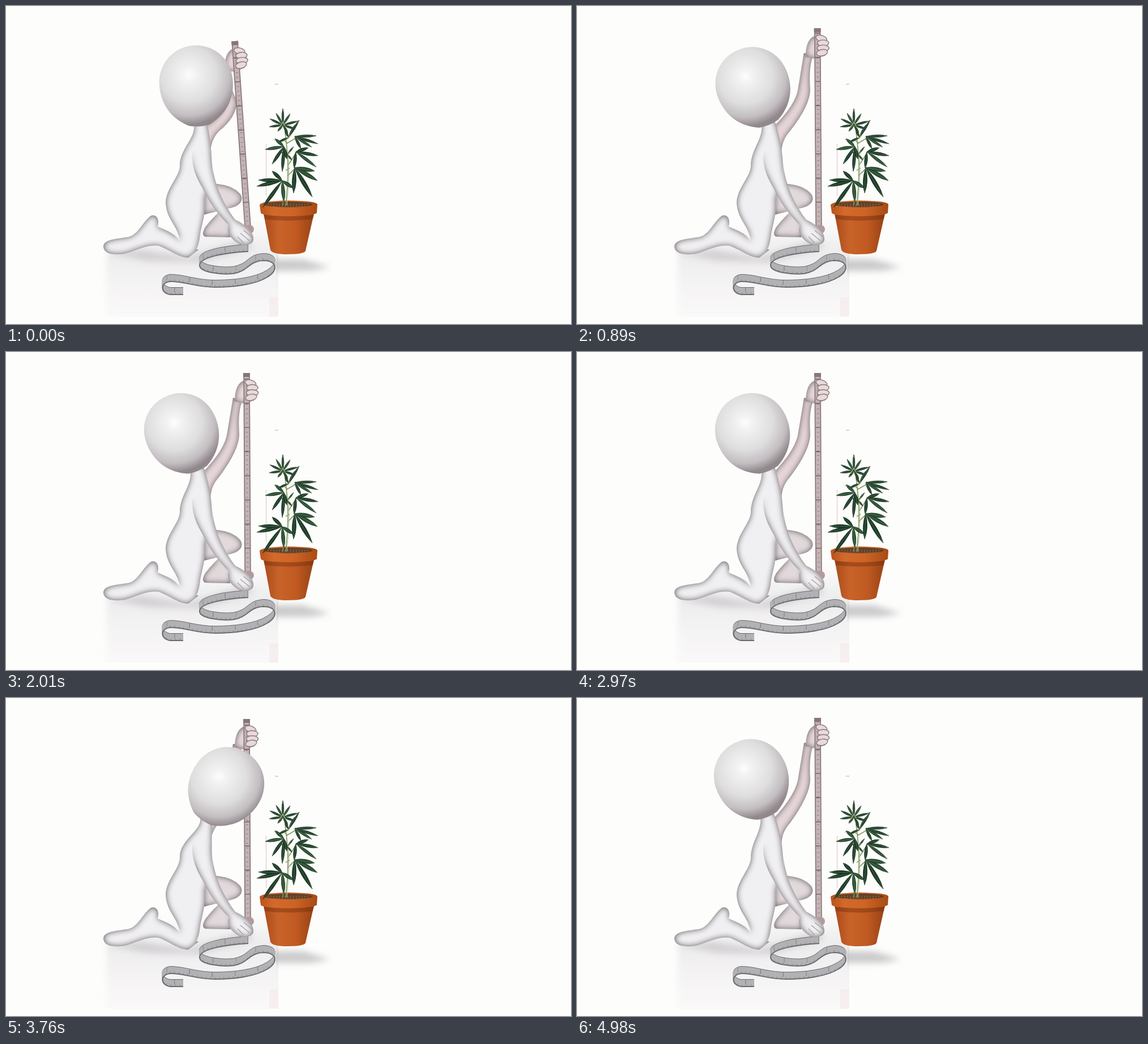
An HTML page that plays this animation: 998 by 561 pixels, repeating every 5.01 s.

```html
<!DOCTYPE html>
<html lang="en">
<head>
<meta charset="utf-8">
<title>Measuring a plant</title>
<style>
html, body { margin: 0; width: 100%; height: 100%; overflow: hidden; background: #fdfdfc; }
svg { display: block; width: 100vw; height: 100vh; }
</style>
</head>
<body>
<svg viewBox="0 0 998 561" fill="none">
  <defs>
    <filter id="round" x="-20%" y="-20%" width="140%" height="140%" color-interpolation-filters="sRGB">
      <feComponentTransfer in="SourceAlpha"><feFuncA type="table" tableValues="1 0"/></feComponentTransfer>
      <feGaussianBlur stdDeviation="5.5" result="edge"/>
      <feFlood flood-color="#5d565c"/>
      <feComposite in2="edge" operator="in"/>
      <feComposite in2="SourceAlpha" operator="in" result="shade"/>
      <feMerge><feMergeNode in="SourceGraphic"/><feMergeNode in="shade"/></feMerge>
    </filter>
    <filter id="blur" x="-30%" y="-60%" width="160%" height="220%"><feGaussianBlur stdDeviation="6"/></filter>
    <radialGradient id="ball" gradientUnits="userSpaceOnUse" cx="-13" cy="-16" r="88">
      <stop offset="0" stop-color="#fdfdfd"/><stop offset=".15" stop-color="#f2f2f3"/>
      <stop offset=".55" stop-color="#dfdedf"/><stop offset=".82" stop-color="#c2bdc0"/>
      <stop offset="1" stop-color="#91888c"/>
    </radialGradient>
    <linearGradient id="rim">
      <stop offset="0" stop-color="#b9531d"/><stop offset=".25" stop-color="#d36a2c"/>
      <stop offset=".6" stop-color="#cd6426"/><stop offset="1" stop-color="#a84a15"/>
    </linearGradient>
    <linearGradient id="clay">
      <stop offset="0" stop-color="#a94b1a"/><stop offset=".3" stop-color="#c86329"/>
      <stop offset=".65" stop-color="#c05a22"/><stop offset="1" stop-color="#974214"/>
    </linearGradient>
    <linearGradient id="fade" x2="0" y2="1">
      <stop offset="0" stop-color="#d9d7da" stop-opacity="0"/><stop offset=".35" stop-color="#dddbde" stop-opacity=".5"/>
      <stop offset="1" stop-color="#f3ecee" stop-opacity=".2"/>
    </linearGradient>
    <linearGradient id="reveal" gradientUnits="userSpaceOnUse" x1="0" y1="255" x2="0" y2="300">
      <stop offset="0" stop-color="#000"/><stop offset="1" stop-color="#fff"/>
    </linearGradient>
    <mask id="shoulder" maskUnits="userSpaceOnUse" x="300" y="200" width="160" height="240">
      <path d="M300 200H460V440H300Z" fill="url(#reveal)"/>
    </mask>
    <clipPath id="left"><path d="M0 0H481V548H0Z"/></clipPath>
    <clipPath id="right"><path d="M477 0H998V561H477Z"/></clipPath>
  </defs>

  <g clip-path="url(#left)">
    <path d="M178 432L350 375H520V560H178Z" fill="url(#fade)" filter="url(#blur)"/>
    <path d="M178 436L240 430 320 444 420 412 440 425 340 452 250 450Z" fill="#aaa6ac" opacity=".4" filter="url(#blur)"/>
    <path d="M465 514H481V548H465Z" fill="#f6e6e7" opacity=".5"/>
  </g>
  <path clip-path="url(#right)" d="M440 446L525 447 572 461 540 467 440 468Z" fill="#a9a9ac" opacity=".6" filter="url(#blur)"/>

  <g id="ribbon"></g>

  <g filter="url(#round)" fill="#e2d9db">
    <path d="M388 352Q366 372 352 390Q344 404 352 407L396 408 400 384Z"/>
    <path d="M350 313C385 312 404 320 414 332C421 344 412 352 398 356L350 368Z"/>
  </g>
  <path id="farArm" fill="#e6d6d8" filter="url(#round)"/>
  <path id="palm" d="M-6 14C-16 18-21 32-21 50L-4 54 14 48 12 18Z" fill="#e6d8da" filter="url(#round)"/>
  <g id="tape">
    <path stroke="#89797b" stroke-width="11.5"/>
    <path stroke="#c3b3b4" stroke-width="8"/>
    <path stroke="#6f5f62" stroke-width="8" stroke-dasharray="0 41 1.6 0"/>
    <path stroke="#8d7b7e" stroke-width="4" stroke-dasharray="1 7.2"/>
  </g>
  <g id="fist" fill="#e8d9da" stroke="#8b797d" stroke-width="1.4">
    <path d="M-6 0H6V7H-6Z" fill="#897578" stroke="none"/>
    <ellipse cx="7" cy="18" rx="10" ry="5.5" transform="rotate(18 7 18)"/>
    <ellipse cx="10" cy="26" rx="10" ry="5.5"/>
    <ellipse cx="10" cy="35" rx="10.5" ry="5.5"/>
    <ellipse cx="8" cy="43" rx="10" ry="5.5" transform="rotate(-12 8 43)"/>
  </g>
  <ellipse cx="429" cy="394" rx="9" ry="8" fill="#b39a9e"/>

  <g filter="url(#round)" fill="#f0eff1">
    <path d="M312 420C296 398 286 398 268 389C272 374 264 367 256 370C242 380 234 402 218 407C200 411 172 410 172 425C174 440 196 439 210 437C234 430 250 420 270 423C292 432 306 444 322 444L340 430Z"/>
    <path id="body"/>
  </g>
  <g mask="url(#shoulder)">
    <path d="M335 236C322 270 332 296 348 323C358 345 374 368 394 387C388 400 398 412 412 420C422 425 438 420 437 411C438 400 424 386 405 377C390 358 376 330 371 312C362 284 364 252 350 226Z" fill="#f0eff1" filter="url(#round)"/>
  </g>
  <path d="M414 401L430 414M420 396L435 408M409 407L420 418" stroke="#a39a9f" stroke-width="1.2"/>
  <path id="head" fill="url(#ball)" d="M0-68C38-68 65-38 65-2C65 35 45 60 18 73Q0 77-18 73C-45 60-65 35-65-2C-65-38-38-68 0-68Z"/>

  <path d="M475 138H481M473 236H476" stroke="#8a8a8a" opacity=".7"/>
  <path d="M459.5 243V335" stroke="#d9a9a2" opacity=".7"/>

  <path d="M455 366L467 430Q470 438 497 438Q526 438 529 432L544 366Z" fill="url(#clay)"/>
  <path d="M455 368H544L542 376Q498 381 457 376Z" fill="#6f2b0a" opacity=".4"/>
  <path d="M448 351Q450 344 499 343Q549 344 550 350L549 365Q545 370 499 371Q452 370 450 365Z" fill="url(#rim)"/>
  <ellipse cx="499" cy="350" rx="43" ry="5" fill="#5f4129"/>
  <path d="M462 350H537M472 353H528" stroke="#a17c52" stroke-dasharray="2 3"/>
  <g id="plant">
    <path d="M494 352Q500 300 497 262T490 205M489 352Q491 326 489 308M497 300L512 285M499 280L513 258M496 262L488 250M495 243L512 233M497 318L484 306" stroke="#7c9460" stroke-width="1.6"/>
    <path d="M496 352Q502 300 499 265" stroke="#b9cf9a"/>
  </g>
</svg>
<script>
const $ = s => document.querySelector(s);
const svgNS = 'http://www.w3.org/2000/svg';
function add(parent, attrs) {
  const el = document.createElementNS(svgNS, 'path');
  for (const k in attrs) el.setAttribute(k, attrs[k]);
  $(parent).append(el);
}

// Tape standing on its edge: one curve repeated downwards.
const curl = 'M428 421C390 423 343 430 342 445C341 459 385 462 402 460C428 456 428 438 455 437C478 437 482 454 462 466C440 480 400 484 370 484C335 484 312 473 290 474C272 476 272 494 290 497L313 497';
for (let i = 0; i <= 12; i++) {
  const edge = i < 1 || i > 11, at = `translate(0 ${i})`;
  add('#ribbon', { d: curl, transform: at, stroke: edge ? '#6c6b6f' : '#b2b1b4', 'stroke-width': 2 });
  if (i > 8) add('#ribbon', { d: curl, transform: at, stroke: '#6c6b6f', 'stroke-width': 1, 'stroke-dasharray': '1 7' });
  else if (i) add('#ribbon', { d: curl, transform: at, stroke: '#66656a', 'stroke-width': 1, 'stroke-dasharray': '1.5 39' });
}

// Each leaf: its joint, blade width, then the blade tips.
const leaves = [
  [497, 262, 3, 508, 248, 486, 258, 505, 272],
  [499, 232, 4, 518, 201, 510, 210, 481, 240, 493, 219],
  [510, 230, 5, 548, 229, 551, 243, 540, 249, 521, 252],
  [491, 248, 6, 458, 253, 470, 279, 488, 292, 475, 234, 496, 270],
  [512, 257, 6, 551, 264, 548, 284, 509, 286, 534, 250],
  [488, 308, 7, 443, 318, 453, 356, 491, 345, 470, 291, 446, 307, 507, 321],
  [510, 285, 8, 550, 308, 541, 337, 508, 330, 545, 291],
  [489, 210, 4, 489, 181, 477, 189, 466, 199, 465, 213, 502, 190, 516, 203, 511, 217, 480, 221, 498, 224]
];
leaves.forEach(([x, y, w, ...tips], n) => {
  for (let i = 0; i < tips.length; i += 2) {
    const dx = tips[i] - x, dy = tips[i + 1] - y, len = Math.hypot(dx, dy);
    const px = -dy / len * w, py = dx / len * w;
    const side = s => `${x + dx * .55 + px * s} ${y + dy * .55 + py * s}`;
    const tip = `${tips[i]} ${tips[i + 1]}`;
    add('#plant', { d: `M${x} ${y}Q${side(.9)} ${tip}Q${side(-.9)} ${x} ${y}`, fill: (i + n) % 3 ? '#1b3b27' : '#2a4f33', stroke: '#14291b', 'stroke-width': .6 });
    add('#plant', { d: `M${x} ${y}L${tip}`, stroke: '#64845a', 'stroke-width': .6 });
  }
});
add('#plant', { d: 'M484 213l5-8 4 7M497 235l5-6M492 238l6 4M498 262l4-5M494 290l7-4', stroke: '#98a860', 'stroke-width': 1.6 });

const out = u => 1 - (1 - u) ** 2;
const inOut = u => u < .5 ? 4 * u ** 3 : 1 - 4 * (1 - u) ** 3;
const linear = u => u;
// time, head x, head y, head tilt, tape top x, tape top y, ease towards this pose
const poses = [
  [0, 336, 137.5, -5, 404, 62],
  [530, 315, 139, -20, 422, 57, out],
  [1080, 310, 140.5, -23, 425, 37, out],
  [2970, 310, 140.5, -23, 425, 37, linear],
  [3470, 385, 151, 33, 425, 37, inOut],
  [3990, 390.5, 155, 35, 425, 37, out],
  [4320, 390.5, 155, 35, 425, 37, linear],
  [4820, 309, 140.5, -23, 425, 36, inOut],
  [4980, 308, 140.5, -23, 425, 35, linear],
  [5010, 308, 140.5, -23, 425, 35, linear]
];
function poseAt(t) {
  const i = poses.findIndex(p => p[0] > t), a = poses[i - 1], b = poses[i];
  const u = b[6]((t - a[0]) / (b[0] - a[0]));
  return [1, 2, 3, 4, 5].map(k => a[k] + (b[k] - a[k]) * u);
}

const tapeLines = document.querySelectorAll('#tape path');
function draw(now) {
  const [hx, hy, tilt, tx, ty] = poseAt(now % 5010);
  $('#head').setAttribute('transform', `translate(${hx} ${hy}) rotate(${tilt})`);
  $('#ball').setAttribute('gradientTransform', `rotate(${-tilt})`);

  // The neck starts inside the head, which covers its end.
  const rad = tilt * Math.PI / 180;
  const nx = hx - 64 * Math.sin(rad), ny = hy + 64 * Math.cos(rad);
  $('#body').setAttribute('d', `M${nx - 11} ${ny}C${nx - 2} 232 310 246 307 278C309 300 284 318 282 346C283 378 304 386 308 418Q314 438 322 443Q338 436 342 410C344 388 354 368 351 340L364 300C364 266 362 240 ${nx + 13} ${ny}Z`);

  for (const line of tapeLines) line.setAttribute('d', `M427 388L${tx} ${ty}`);
  const ex = 402 - (425 - tx) * .2, ey = 163 + (ty - 37) * .9;
  const wx = tx - 15, wy = ty + 46;
  $('#farArm').setAttribute('d', `M346 214Q${ex - 14} ${ey + 8} ${ex - 11} ${ey - 22}L${wx - 9} ${wy - 2}L${wx + 9} ${wy}Q${wx - 1} ${wy + 18} ${ex + 10} ${ey - 18}Q${ex + 10} ${ey + 10} 376 221Q362 236 361 258L346 240Z`);
  for (const id of ['#palm', '#fist']) $(id).setAttribute('transform', `translate(${tx} ${ty}) rotate(${(tx - 425) * .2})`);
  requestAnimationFrame(draw);
}
draw(0);
</script>
</body>
</html>
```
